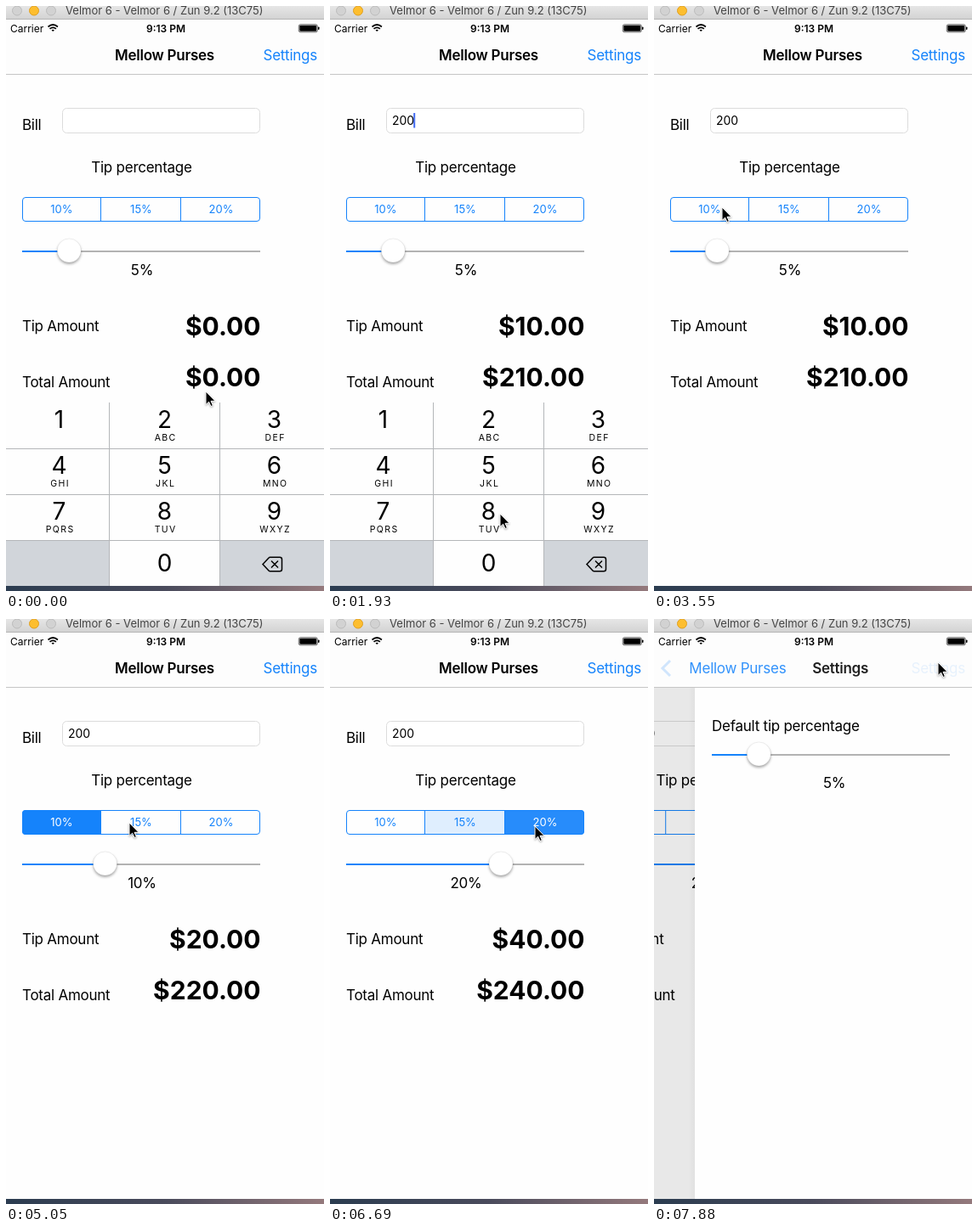
An HTML page for the animation above (8000 ms loop, 374 px wide and 689 px high).

```html
<!DOCTYPE html>
<html lang="en">
<head>
<meta charset="utf-8">
<title>Tip calculator</title>
<style>
  html, body { margin: 0; width: 100%; height: 100%; overflow: hidden; background: #fefefe; }
  svg { display: block; width: 374px; height: 689px; font: 17px Inter, Roboto, sans-serif; letter-spacing: -.25px; }
  .mid { text-anchor: middle; }
  .end { text-anchor: end; }
  .blue { fill: #1583fb; }
  .bold { font-weight: 600; }
  .small { font-size: 13px; letter-spacing: 0; }
  .status { font-size: 12px; letter-spacing: 0; }
  .sum { font-size: 30px; font-weight: 700; letter-spacing: 0; }
  .digit { font-size: 28px; letter-spacing: 0; }
  .letters { font-size: 10.5px; letter-spacing: 1.4px; }
  .line { fill: none; stroke: #1583fb; }
  .knob { fill: #fff; stroke: #0001; filter: drop-shadow(0 2px 1.5px #0005); }
  #pointer { stroke: #fff; filter: drop-shadow(0 1px 1px #0005); }
</style>
</head>
<body>
<svg viewBox="0 0 374 689">
  <defs>
    <linearGradient id="bar" x2="0" y2="1"><stop stop-color="#e6e6e6"/><stop offset="1" stop-color="#d3d3d3"/></linearGradient>
    <linearGradient id="desk"><stop stop-color="#2b3c50"/><stop offset=".5" stop-color="#4a4b5c"/><stop offset="1" stop-color="#94797c"/></linearGradient>
    <linearGradient id="edge"><stop stop-color="#000" stop-opacity="0"/><stop offset="1" stop-color="#000" stop-opacity=".03"/></linearGradient>
    <clipPath id="segClip"><rect x="19" y="225" width="280" height="29" rx="4"/></clipPath>
  </defs>
  <rect width="374" height="689" fill="#fefefe"/>

  <g id="main">
    <text x="19" y="145.500">Bill</text>
    <rect x="66.500" y="120.500" width="232" height="29" rx="5" fill="#fff" stroke="#dcdcdc"/>
    <text id="bill" x="73" y="140" font-size="14" style="letter-spacing:0"></text>
    <rect id="caret" y="126" width="2" height="17.500" fill="#426bf2"/>
    <text class="mid" x="159.500" y="195.500">Tip percentage</text>
    <g id="segs" clip-path="url(#segClip)"></g>
    <path class="line" d="M111.500 226v27M205.500 226v27"/>
    <rect class="line" x="19.500" y="225.500" width="279" height="28" rx="3.500"/>
    <g id="slider"></g>
    <text id="percent" class="mid" x="160" y="317"></text>
    <text x="19" y="382.500">Tip Amount</text>
    <text x="19" y="448.500">Total Amount</text>
    <text id="tip" class="sum end" x="299.500" y="388"></text>
    <text id="total" class="sum end" x="299.500" y="448"></text>
  </g>

  <g id="keypad"></g>
  <rect id="dim" y="80" width="374" height="603"/>

  <g id="panel">
    <rect x="-8" y="81" width="8" height="602" fill="url(#edge)"/>
    <rect y="81" width="374" height="602" fill="#fefefe"/>
    <text x="20" y="131.500">Default tip percentage</text>
    <g id="slider2" transform="translate(1 -129)"></g>
    <text class="mid" x="164" y="199">5%</text>
  </g>

  <rect y="16" width="374" height="64" fill="#fdfdfd"/>
  <path d="M0 80.500h374" stroke="#c6c6c6"/>
  <text id="title" class="bold mid" x="186.500" y="64">Mellow Purses</text>
  <text id="open" class="blue end" x="366" y="64">Settings</text>
  <path id="chevron" class="line" d="M19 49l-9 9 9 9" stroke-width="3"/>
  <text id="back" class="blue" y="64">Mellow Purses</text>
  <text id="title2" class="bold mid" y="64">Settings</text>

  <text class="status" x="5" y="30.500">Carrier</text>
  <g fill="none" stroke="#000" stroke-width="1.700">
    <path d="M49.500 24.500q5.700-5 11.400 0M51.500 26.900q3.700-3.200 7.400 0"/>
    <path d="M53.500 28.400q1.700-1.300 3.400 0l-1.700 1.700z" fill="#000" stroke="none"/>
  </g>
  <text class="status bold mid" x="188" y="30.500">9:13 PM</text>
  <rect x="344.300" y="21.800" width="22" height="9" rx="2" fill="none" stroke="#000" stroke-width=".6"/>
  <rect x="345.300" y="22.800" width="20" height="7" rx="1"/>
  <rect x="367" y="24.500" width="1.500" height="3.500" rx=".7"/>

  <rect width="374" height="15" fill="url(#bar)"/>
  <path d="M0 15.500h374" stroke="#b5b5b5"/>
  <g stroke="#bcbcbc" fill="#d2d2d2">
    <circle cx="13" cy="5.500" r="5.500"/>
    <circle cx="33" cy="5.500" r="5.500" fill="#fdbe2f" stroke="#dfa023"/>
    <circle cx="53" cy="5.500" r="5.500"/>
  </g>
  <text class="small" x="70" y="10" fill="#444">Velmor 6 - Velmor 6 / Zun 9.2 (13C75)</text>
  <rect y="683" width="374" height="6" fill="url(#desk)"/>
  <path id="pointer" d="M0 0V15.500L3.600 12.200 6 17.500 8.400 16.500 6 11.300H11Z"/>
</svg>
<script>
const TICK = 148.6, LOOP = 8000, WIDTH = 374;
const $ = id => document.getElementById(id);
const set = (el, attrs) => { for (const a in attrs) el.setAttribute(a, attrs[a]); };
const move = (id, x, y = 0) => set($(id), { transform: `translate(${x} ${y})` });

// Keypad
const cols = [0, 121.5, 251.5, 374], centers = [62.5, 186.5, 315.5];
const labels = ['', 'ABC', 'DEF', 'GHI', 'JKL', 'MNO', 'PQRS', 'TUV', 'WXYZ'];
const cell = (c, r, id, fill) =>
  `<rect ${id ? `id="${id}"` : ''} x="${cols[c]}" y="${467 + r * 54}" width="${cols[c + 1] - cols[c]}" height="54" fill="${fill}"/>`;
const digit = (x, y, n) => `<text class="digit mid" x="${x}" y="${y}">${n}</text>`;
$('keypad').innerHTML =
  '<rect y="467" width="374" height="216" fill="#fefefe"/>' +
  cell(0, 3, '', '#d1d5da') + cell(2, 3, '', '#d1d5da') +
  cell(1, 0, 'key2', '#d1d5da') + cell(1, 3, 'key0', '#d1d5da') +
  '<path d="M0 521.5h374M0 575.5h374M0 629.5h374M121.5 467v216M251.5 467v216" stroke="#b4b6b9"/>' +
  labels.map((s, i) => {
    const x = centers[i % 3], y = 497 + 54 * (i / 3 | 0);
    return digit(x, y, i + 1) + `<text class="letters mid" x="${x + 1.2}" y="${y + 15}">${s}</text>`;
  }).join('') + digit(186.5, 666, 0) +
  '<path d="M302 657.500L309 650q.6-.7 1.500-.7H322q2.500 0 2.500 2.500v11.400q0 2.500-2.500 2.500H310.500q-.9 0-1.500-.7ZM312 653.500l8 8m0-8l-8 8" fill="none" stroke="#000" stroke-width="1.500"/>';

// Segmented control
const tips = [10, 15, 20], edges = [19, 111.5, 205.5, 299], picks = [31, 37, 45, Infinity];
$('segs').innerHTML = tips.map((p, i) =>
  `<rect class="blue" x="${edges[i]}" y="225" width="${edges[i + 1] - edges[i]}" height="29"/>
   <text class="small mid" x="${[65.3, 159, 253][i]}" y="244">${p}%</text>`).join('');
const segRects = [...$('segs').querySelectorAll('rect')];
const segTexts = [...$('segs').querySelectorAll('text')];

function drawSlider(id, pct) {
  const x = 32 + 8.45 * pct;
  $(id).innerHTML = `<path d="M19 289H299" stroke="#b3b3b3" stroke-width="2"/>
    <path d="M19 289H${x}" stroke="#1583fb" stroke-width="2"/>
    <circle class="knob" cx="${x}" cy="288" r="14"/>`;
}
drawSlider('slider2', 5);

// Pointer stops: tick, x, y
const stops = [
  [0, 235, 454], [3, 192, 490], [5, 192, 490], [8, 190, 667], [12, 190, 667],
  [13, 200, 598], [15, 172, 355], [18, 172, 355], [24, 80, 237], [33, 80, 237],
  [34, 145, 240], [35, 155, 241], [37, 155, 241], [39, 283, 246], [42, 241, 244],
  [45, 241, 244], [48, 334, 51], [60, 334, 51]
];
function pointerAt(k) {
  const i = stops.findIndex(s => s[0] > k), [a, b] = [stops[i - 1], stops[i]];
  const u = (k - a[0]) / (b[0] - a[0]);
  return [a[1] + (b[1] - a[1]) * u, a[2] + (b[2] - a[2]) * u];
}

function segAlpha(i, k) {
  const on = picks[i], off = picks[i + 1];
  if (k === on - 1 || k === off) return .13;
  return k === on ? .92 : k > on && k < off ? 1 : 0;
}

function draw(k) {
  const bill = k < 5 ? '' : k < 9 ? '2' : k < 11 ? '20' : '200';
  const pct = k < 31 ? 5 : k < 37 ? 10 : k < 45 ? 15 : 20;
  const tip = bill * pct / 100;
  $('bill').textContent = bill;
  $('percent').textContent = pct + '%';
  $('tip').textContent = '$' + tip.toFixed(2);
  $('total').textContent = '$' + (+bill + tip).toFixed(2);
  drawSlider('slider', pct);

  const caretOn = k >= 2 && k <= 13 || k === 17;
  set($('caret'), { x: 72 + $('bill').getComputedTextLength(), opacity: +caretOn });
  set($('key2'), { opacity: +(k === 4) });
  set($('key0'), { opacity: +(k === 8 || k === 10) });
  const drop = Math.min(1, Math.max(0, (k - 16) / 3));
  move('keypad', 0, 217 * drop * drop * (3 - 2 * drop));

  tips.forEach((_, i) => {
    const a = segAlpha(i, k);
    set(segRects[i], { opacity: a });
    set(segTexts[i], { fill: a > .5 ? '#fff' : '#1583fb' });
  });

  // Push to the settings panel: p runs from 1 down to 0
  const p = k < 50 ? 1 : Math.exp(-.684 * (k - 50)), shown = 1 - p;
  move('main', -.3 * WIDTH * shown);
  move('panel', WIDTH * p + (p === 1 ? 10 : 0));
  set($('dim'), { opacity: .1 * shown });
  set($('title'), { opacity: Math.max(0, 1 - 1.6 * shown), x: 186.5 - 102 * shown });
  set($('open'), { opacity: k < 50 ? 1 : .25 * p ** .5 });
  set($('chevron'), { opacity: shown ** 12 });
  set($('back'), { opacity: shown, x: 28 + 104 * p });
  set($('title2'), { opacity: shown, x: 187 + 250 * p });

  move('pointer', ...pointerAt(k));
}

let last = -1;
function frame() {
  const k = Math.floor((performance.now() % LOOP + 20) / TICK);
  if (k !== last) draw(last = k);
  requestAnimationFrame(frame);
}
frame();
</script>
</body>
</html>
```
